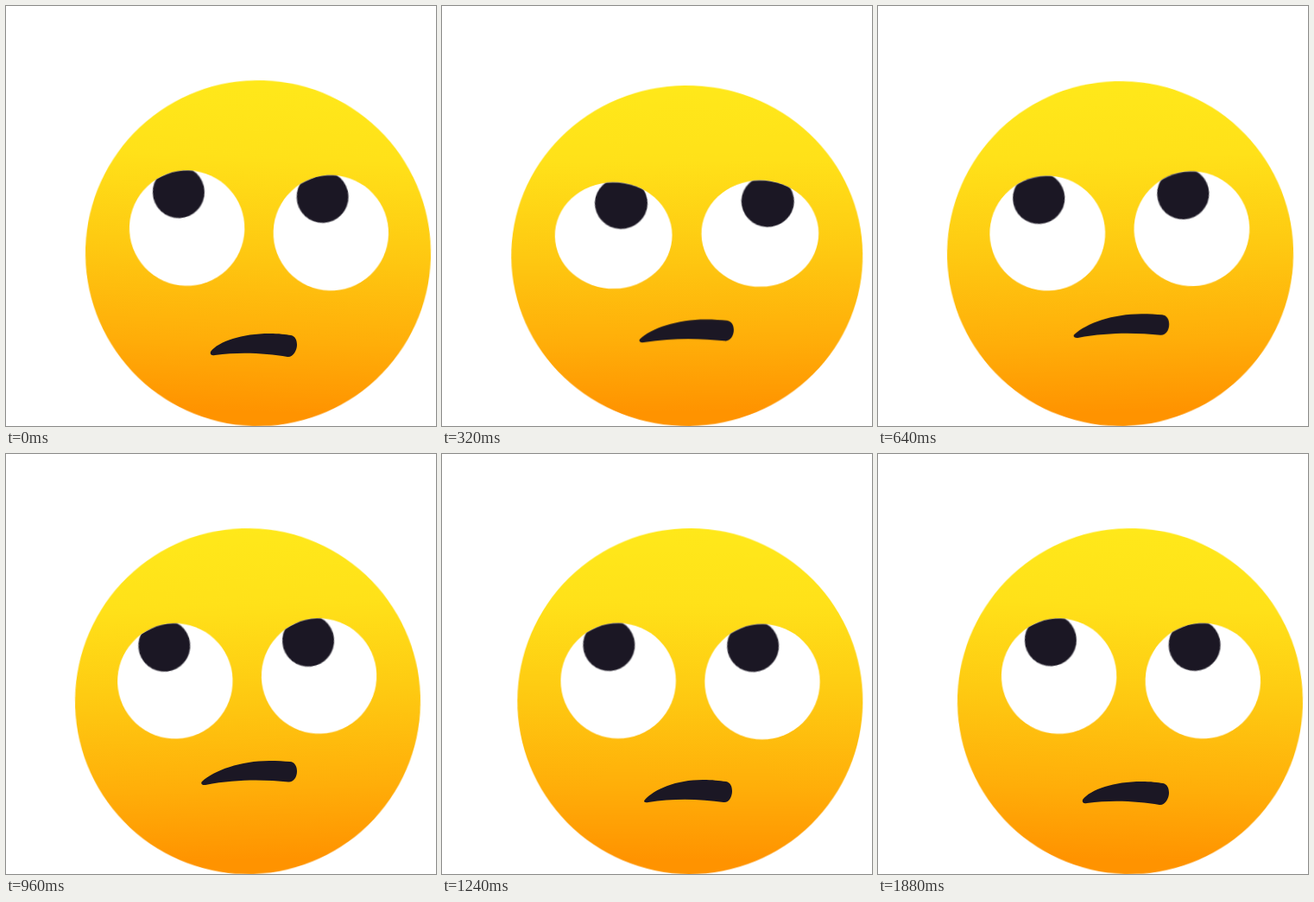
Recreate the animation shown at these times as an HTML page. Size 498x486 px, loop 1.92 s.

```html
<!DOCTYPE html>
<html lang="en">
<head>
<meta charset="utf-8">
<title>Rolling eyes</title>
<style>
  html, body { margin: 0; width: 100%; height: 100%; overflow: hidden; background: #fff; }
  svg { display: block; width: 498px; height: 486px; }

  .sway, .squash, .turn, .eyes, .lid, .orbit, .pupil, .mouth {
    animation-duration: 1920ms;
    animation-iteration-count: infinite;
    animation-timing-function: cubic-bezier(.33, 0, 0, 1);
  }
  .sway   { animation-name: sway; }
  .squash { animation-name: squash; transform-origin: 0 486px; }
  .turn   { animation-name: turn; transform-origin: 0 286px; }
  .eyes   { animation-name: dip; }
  .lid    { animation-name: lid; fill: #fff; }
  .orbit  { animation-name: orbit; }
  .pupil  { animation-name: reach; fill: #1b1724; }
  .mouth  { animation-name: mouth; fill: #1b1724; }
  .jaw    { transform-origin: 283px 376px; }

  @keyframes sway {
    0%, 100% { transform: translateX(292px); }
    50%      { transform: translateX(280px); }
  }
  @keyframes turn {
    0%, 100% { transform: rotate(1.9deg); }
    50%      { transform: rotate(-2deg); }
  }

  /* Bounce: quick squeeze, then a long settle */
  @keyframes squash {
    0%      { transform: scale(1, 1); animation-timing-function: ease-in-out; }
    8.333%  { transform: scale(1.045, .962); animation-timing-function: cubic-bezier(.4, 0, .6, .77); }
    16.667% { transform: scale(1.0175, .985); animation-timing-function: cubic-bezier(.2, .42, .5, .95); }
    33.333% { transform: scale(1.0025, .9975); animation-timing-function: ease-out; }
    50%, 100% { transform: scale(1, 1); }
  }
  @keyframes lid {
    0%      { ry: 66.7px; animation-timing-function: ease-in-out; }
    8.333%  { ry: 56px; animation-timing-function: cubic-bezier(.4, 0, .6, .77); }
    16.667% { ry: 62.4px; animation-timing-function: cubic-bezier(.2, .42, .5, .95); }
    33.333% { ry: 66.5px; animation-timing-function: ease-out; }
    50%, 100% { ry: 66.7px; }
  }
  @keyframes dip {
    0%      { transform: translateY(0); animation-timing-function: ease-in-out; }
    16.667% { transform: translateY(1.3px); animation-timing-function: ease-out; }
    33.333%, 50% { transform: translateY(0); animation-timing-function: cubic-bezier(.5, 0, .6, 1); }
    64.583% { transform: translateY(3.2px); animation-timing-function: cubic-bezier(.3, 0, .3, 1); }
    81.25%, 100% { transform: translateY(0); }
  }

  /* One full roll of the pupils */
  @keyframes orbit {
    0%      { transform: rotate(-15deg); animation-timing-function: cubic-bezier(.3, 0, .4, .9); }
    16.667% { transform: rotate(-346deg); animation-timing-function: cubic-bezier(.25, .6, .5, .95); }
    33.333% { transform: rotate(-372deg); animation-timing-function: ease-out; }
    50%, 100% { transform: rotate(-375deg); }
  }
  @keyframes reach {
    0%      { cy: -42.8px; animation-timing-function: ease-in-out; }
    8.333%  { cy: -34px; animation-timing-function: ease-in-out; }
    16.667% { cy: -38.8px; animation-timing-function: ease-out; }
    33.333% { cy: -42px; }
    50%, 100% { cy: -42.8px; }
  }

  @keyframes mouth {
    0%, 83.333%, 100% {
      d: path("M237 400C246 388 274 379 305 379C316 379 324 380 330 381C335 382 337 387 337 392C337 399 332 407 326 406C302 402 272 400 242 404C238 405 236 403 237 400Z");
    }
    50% {
      d: path("M227 379C241 366 272 355 305 355C314 355 322 355.5 329 356C334 356.5 337 361 337 367C337 374 333 380 327 379.5C300 377 268 376 231 383C227 383.5 225 381 227 379Z");
      animation-timing-function: cubic-bezier(.5, 0, .7, .8);
    }
    64.583% {
      d: path("M235 400C246 388 271 377 302 377C313 377 321 378 329 379C334 380 336 385 336 390C336 397 332 404 326 403C300 399 268 398 239 403C234 404 233 402 235 400Z");
      animation-timing-function: ease-out;
    }
  }
</style>
</head>
<body>
<svg viewBox="0 0 498 486">
  <defs>
    <linearGradient id="skin" gradientUnits="userSpaceOnUse" x1="0" y1="86" x2="0" y2="486">
      <stop offset="0" stop-color="#ffe81a"/>
      <stop offset=".22" stop-color="#ffe119"/>
      <stop offset=".5" stop-color="#fec811"/>
      <stop offset=".75" stop-color="#ffae09"/>
      <stop offset=".96" stop-color="#ff9300"/>
    </linearGradient>
    <clipPath id="opening"><ellipse class="lid" rx="66.7" ry="66.7"/></clipPath>
  </defs>

  <g class="sway">
    <g class="squash">
      <g class="turn">
        <circle cy="286" r="200" fill="url(#skin)"/>
        <g class="eyes">
          <g transform="translate(-83.3 259.8)">
            <ellipse class="lid" rx="66.7" ry="66.7"/>
            <g clip-path="url(#opening)">
              <g class="orbit"><circle class="pupil" cy="-42.8" r="30"/></g>
            </g>
          </g>
          <g transform="translate(83.5 259.8)">
            <ellipse class="lid" rx="66.7" ry="66.7"/>
            <g clip-path="url(#opening)">
              <g class="orbit"><circle class="pupil" cy="-42.8" r="30"/></g>
            </g>
          </g>
        </g>
      </g>
    </g>
  </g>
  <g class="squash jaw">
    <path class="mouth" d="M237 400C246 388 274 379 305 379C316 379 324 380 330 381C335 382 337 387 337 392C337 399 332 407 326 406C302 402 272 400 242 404C238 405 236 403 237 400Z"/>
  </g>
</svg>
</body>
</html>
```
